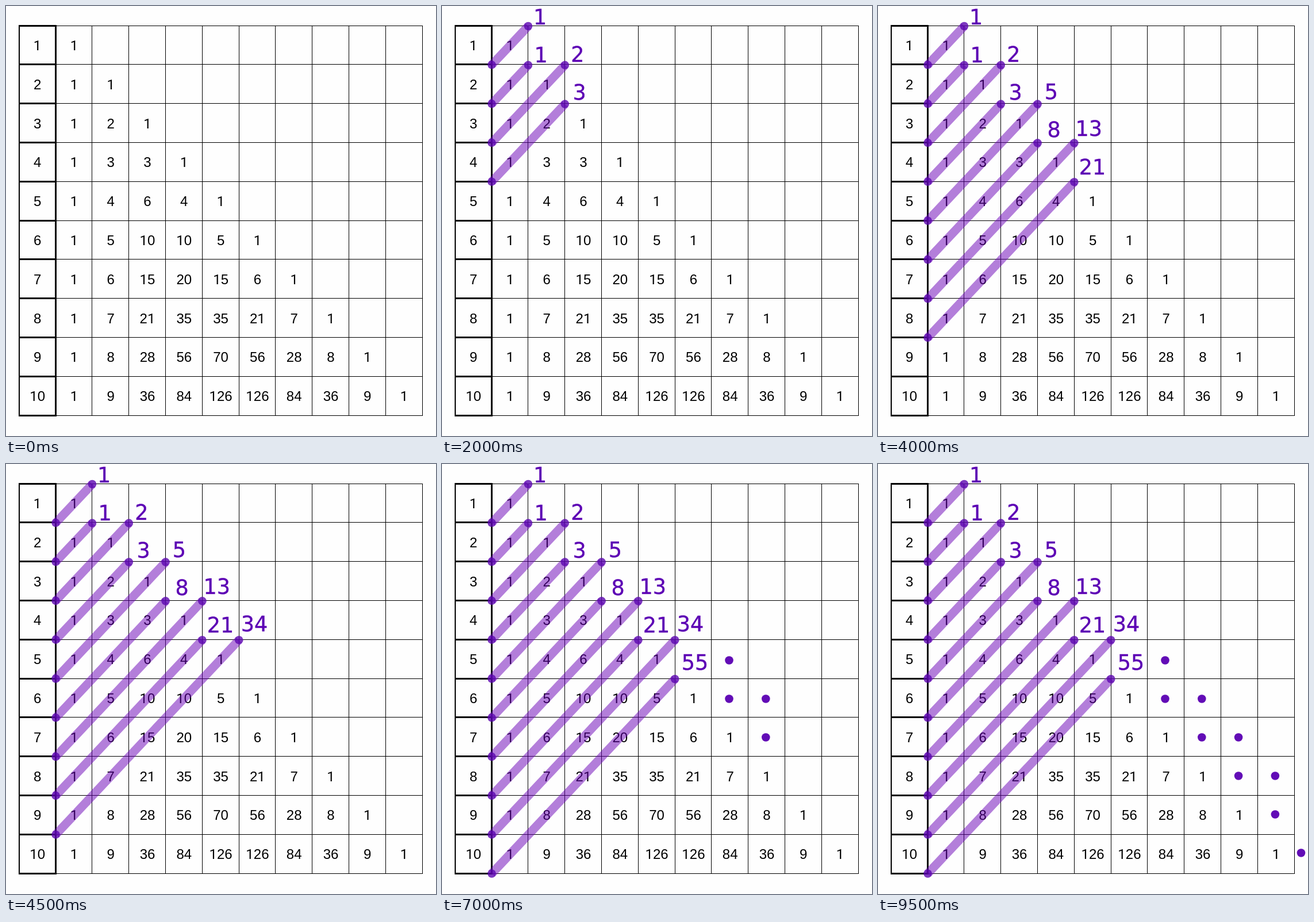
Recreate the animation shown at these times as an HTML page. Size 748 by 748 pixels, loop 10000 ms.

```html
<!DOCTYPE html>
<html lang="en">
<head>
<meta charset="utf-8">
<title>Diagonal sums</title>
<style>
  html, body { margin: 0; width: 100%; height: 100%; overflow: hidden; background: #fefefe; }
  svg { display: block; width: 100vw; height: 100vh; }
  text { text-anchor: middle; }
  .cell { font: 24px "Liberation Sans", Arial, sans-serif; }
  .one { font-family: Roboto, sans-serif; }
  .sum { font: 36.5px "DejaVu Sans", sans-serif; fill: #5c00b4; stroke: #5c00b4; stroke-width: .4; }
  .band { stroke: #6a00b8; stroke-width: 15; opacity: .5; }
  .end { fill: #5c06b0; opacity: .8; }
  .dot { fill: #620cb6; }
</style>
</head>
<body>
<svg id="stage" viewBox="0 0 748 748"></svg>
<script>
const stage = document.getElementById('stage');
const N = 10, STEP = 500, LOOP = 10000;
const W = 63.8, H = 67.8, LEFT = 86, TOP = 34;

function add(parent, tag, attrs, html = '') {
  const el = document.createElementNS('http://www.w3.org/2000/svg', tag);
  for (const k in attrs) el.setAttribute(k, attrs[k]);
  el.innerHTML = html;
  return parent.appendChild(el);
}
const rect = (x, y, width, height) => add(stage, 'rect', { x, y, width, height });
const circle = (parent, cx, cy, cls) => add(parent, 'circle', { cx, cy, r: 7.3, class: cls });
const colX = i => LEFT + W * i;
const rowY = i => TOP + H * i;

// Table numerals use a "1" without a foot
function cell(c, r, value) {
  const html = String(value).replace(/1/g, '<tspan class="one">1</tspan>');
  add(stage, 'text', { x: colX(c + .5) + .5, y: rowY(r) + 43, class: 'cell' }, html);
}

// Grid
for (let i = 0; i <= N; i++) {
  const x = Math.floor(colX(i)), y = Math.floor(rowY(i));
  rect(23, y, 702, 1);
  rect(22, y - 1, 66, 3);
  rect(x, TOP, 1, 679);
}
rect(22, TOP - 1, 2, 681);
rect(LEFT - 1, TOP - 1, 3, 681);

// Row numbers and Pascal's triangle
for (let r = 0; r < N; r++) {
  cell(-1, r, r + 1);
  for (let c = 0, v = 1; c <= r; c++) {
    cell(c, r, v);
    v = v * (r - c) / (c + 1);
  }
}

// Shallow diagonals; each label drifts up and right of its band's end
const steps = [];
for (let n = 0, sum = 1, next = 1; n < N; n++) {
  const cols = Math.floor(n / 2) + 1;
  const x1 = LEFT + .5, y1 = rowY(n + 1) + .5;
  const x2 = colX(cols) + .2, y2 = rowY(n + 1 - cols) + 1;
  const g = add(stage, 'g', {});
  add(g, 'line', { x1, y1, x2, y2, class: 'band' });
  circle(g, x1, y1, 'end');
  circle(g, x2, y2, 'end');
  const x = x2 + 20.5 + n * (n % 2 ? 1.6 : .8), y = y2 - 3 - 1.5 * n;
  add(g, 'text', { x, y, class: 'sum' }, sum);
  [sum, next] = [next, sum + next];
  steps.push(g);
}

// Staircase of dots, ending outside the table
for (let i = 0; i < 8; i++) {
  const x = 499.5 + W * Math.floor(i / 2), y = 341.5 + 67 * Math.ceil(i / 2);
  steps.push(circle(stage, x, y, 'dot'));
}
steps.push(circle(stage, 736, 676.5, 'dot'));

function draw() {
  const shown = Math.floor(performance.now() % LOOP / STEP);
  steps.forEach((el, i) => el.setAttribute('visibility', i < shown ? 'visible' : 'hidden'));
  requestAnimationFrame(draw);
}
draw();
</script>
</body>
</html>
```
